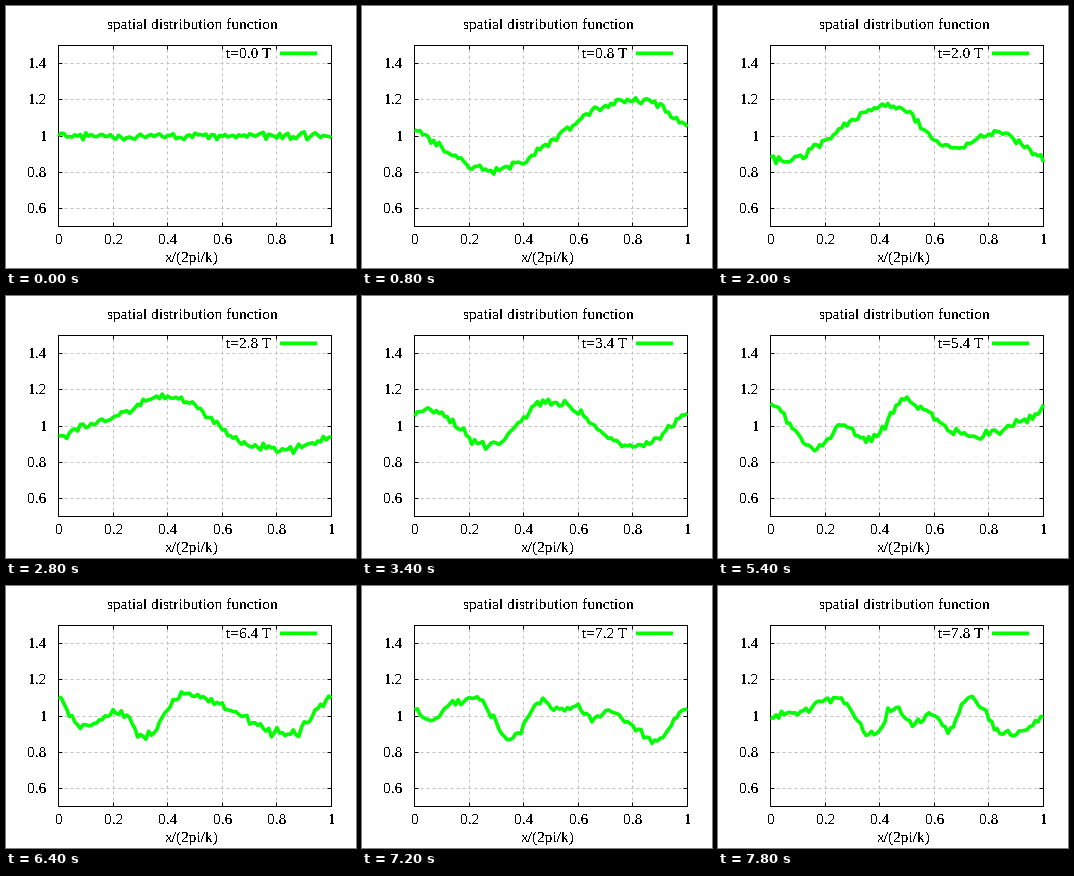
These frames come from a looping animation (350x262 px, 8 s). A matplotlib script:

```python
import numpy as np
import matplotlib.pyplot as plt
from matplotlib.animation import FuncAnimation

W, H, DPI = 350, 262, 100
LEFT, RIGHT, TOP, BOTTOM = 52.5, 325.5, 39.5, 220.5
FRAMES, STEP_MS = 40, 200
GREEN, GRID = "#00ff00", "#c0c0c0"
PT = 72 / DPI  # points per pixel
CELLS, MODES = 100, 12

plt.rcParams["text.antialiased"] = False

# Crests and troughs (x, density) of the wave at key times
extrema = {
    0.8: [(.28, .815), (.79, 1.2)],
    2.0: [(.04, .865), (.44, 1.17), (.67, .935), (.83, 1.015)],
    2.6: [(.32, 1.17), (.82, .83)],
    3.4: [(.05, 1.09), (.27, .89), (.49, 1.14), (.81, .88)],
    4.6: [(0, 1.1), (.19, .865), (.31, 1.03), (.41, .95), (.51, 1.115), (.7, .935)],
    6.4: [(0, 1.1), (.08, .94), (.23, 1.025), (.31, .885), (.46, 1.12), (.85, .9)],
    7.8: [(.06, 1.01), (.24, 1.11), (.37, .89), (.46, 1.05), (.52, .955),
          (.59, 1.01), (.65, .925), (.73, 1.1), (.86, .895)],
}


def spectrum(points):
    """Join extrema with half cosines around the period; return its modes."""
    px_, py_ = np.array(points).T
    kx = np.concatenate([[px_[-1] - 1], px_, [px_[0] + 1]])
    ky = np.concatenate([[py_[-1]], py_, [py_[0]]])
    x = np.arange(CELLS) / CELLS
    i = np.clip(np.searchsorted(kx, x, side="right") - 1, 0, len(kx) - 2)
    u = (x - kx[i]) / (kx[i + 1] - kx[i])
    y = ky[i] + (ky[i + 1] - ky[i]) * (1 - np.cos(np.pi * u)) / 2
    return np.fft.rfft(y)[:MODES + 1] / CELLS


times = np.array([0, *extrema])
modes = [spectrum(p) for p in extrema.values()]
calm = modes[0] * 1e-6
calm[0] = 1
modes.insert(0, calm)
xs = np.linspace(0, 1, CELLS + 1)
waves = np.exp(2j * np.pi * np.outer(xs, np.arange(MODES + 1)))
weights = np.r_[1, np.full(MODES, 2)]


def density(n):
    """Blend modes by amplitude and phase, then add sampling noise."""
    t = n * STEP_MS / 1000
    i = min(np.searchsorted(times, t + 1e-9, side="right") - 1, len(times) - 2)
    u = (t - times[i]) / (times[i + 1] - times[i])
    a, b = modes[i], modes[i + 1]
    turn = np.angle(b * np.conj(a))
    grow = u ** 1.5 if i == 0 else u
    size = abs(a) + (abs(b) - abs(a)) * grow
    mix = size * np.exp(1j * (np.angle(a) + turn * u))
    noise = np.random.default_rng(n + 11).normal(0, .0115, xs.size)
    return (waves @ (weights * mix)).real + noise


def px(x):
    return LEFT + x * (RIGHT - LEFT)


def py(y):
    return BOTTOM - (y - .5) * (BOTTOM - TOP)


def centre(v):
    return np.floor(v) + .5


fig = plt.figure(figsize=(W / DPI, H / DPI), dpi=DPI, facecolor="white")
ax = fig.add_axes([0, 0, 1, 1])
ax.set_xlim(0, W)
ax.set_ylim(H, 0)
ax.axis("off")


def rule(x, y, color="black", **kw):
    ax.plot(x, y, color=color, lw=PT, solid_capstyle="butt", snap=False, **kw)


def label(x, y, s, ha="center"):
    return ax.text(x, y, s, ha=ha, va="baseline", family="Liberation Serif",
                   fontsize=15.4 * PT, color="black", zorder=5)


dash = dict(color=GRID, dashes=(3, 3), zorder=1)
for v in (0, .2, .4, .6, .8, 1):
    x = centre(px(v))
    if 0 < v < 1:
        rule([x, x], [BOTTOM, TOP], **dash)
        rule([x, x], [BOTTOM, BOTTOM - 4], zorder=2)
        rule([x, x], [TOP, TOP + 4], zorder=2)
    label(x + .5, 238, f"{v:g}")
for v in (.6, .8, 1, 1.2, 1.4):
    y = centre(py(v))
    rule([LEFT, RIGHT], [y, y], **dash)
    rule([LEFT, LEFT + 4], [y, y], zorder=2)
    rule([RIGHT, RIGHT - 4], [y, y], zorder=2)
    label(41, y + 4.5, f"{v:g}", "right")
rule([LEFT, RIGHT, RIGHT, LEFT, LEFT], [TOP, TOP, BOTTOM, BOTTOM, TOP], zorder=3)

label(186.5, 23, "spatial distribution function")
label(185.5, 256, "x/(2pi/k)")
clock = label(265.5, 52, "", "right")

stroke = dict(color=GREEN, lw=3.6 * PT, solid_joinstyle="round",
              solid_capstyle="butt", snap=False, zorder=4)
ax.plot([274, 311], [47.3, 47.3], **stroke)
curve, = ax.plot([], [], **stroke)


def draw(n):
    curve.set_data(px(xs), py(density(n)))
    clock.set_text(f"t={n * STEP_MS / 1000:.1f} T")
    return curve, clock


anim = FuncAnimation(fig, draw, frames=FRAMES, interval=STEP_MS,
                     repeat=True, repeat_delay=0, blit=False)
plt.show()
```
